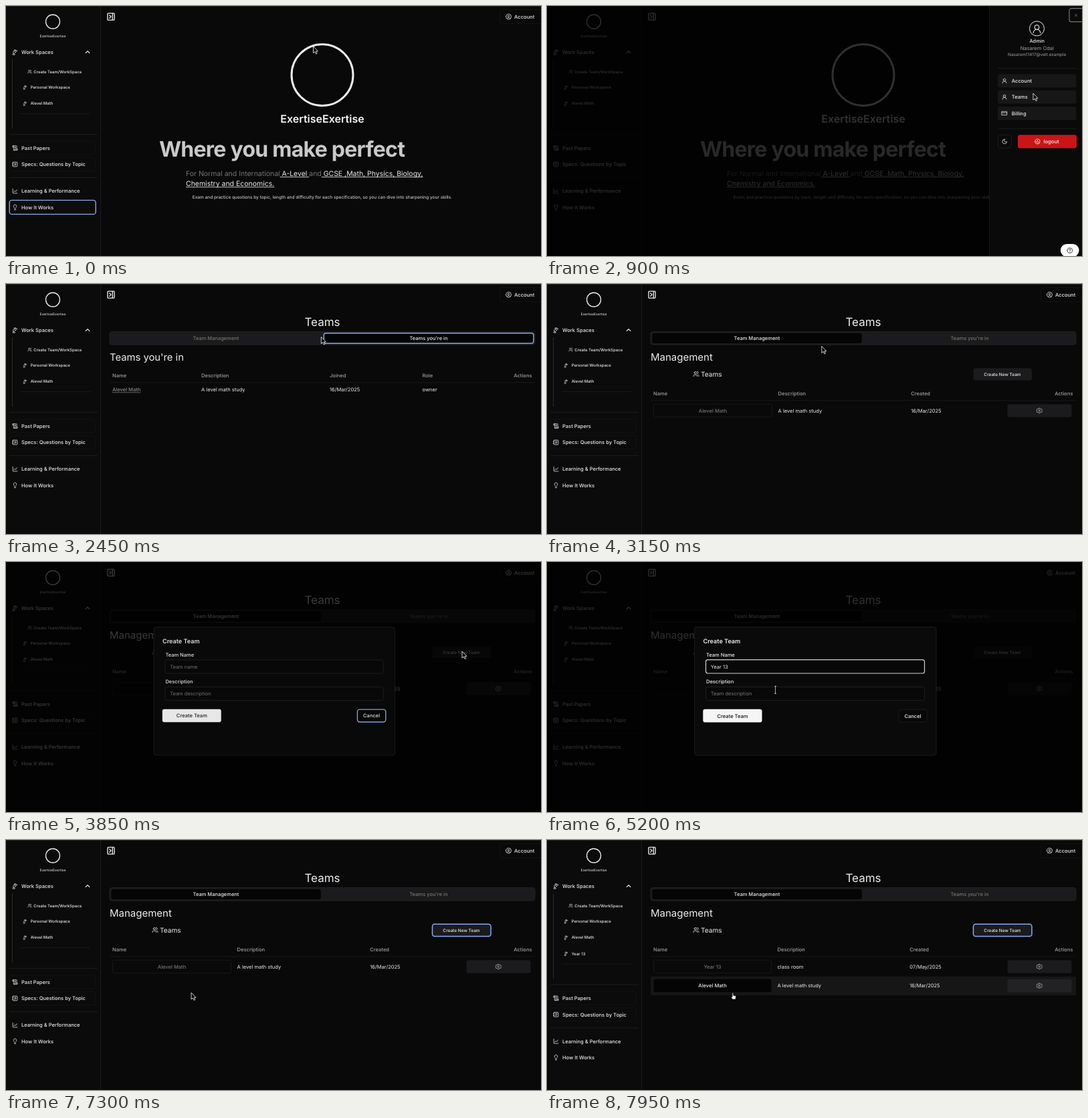
Recreate the animation shown at these times as an HTML page with a canvas. Size 800 by 375 pixels, loop 8000 ms.

```html
<!DOCTYPE html>
<html lang="en">
<head>
<meta charset="utf-8">
<title>Team workspace walkthrough</title>
<style>
html, body { margin: 0; width: 100%; height: 100%; overflow: hidden; background: #090909; }
canvas { display: block; width: 800px; height: 375px; }
</style>
</head>
<body>
<canvas></canvas>
<script>
const LOOP = 8000, W = 800, H = 375;
const WHITE = '#ededed', GREY = '#a0a0a0', DIM = '#757575', LINE = '#1c1c1c';
const PANEL = '#1b1b1d', RING = '#8aabed';
const BRAND = 'ExertiseExertise';

const canvas = document.querySelector('canvas');
const ctx = canvas.getContext('2d');
const dpr = window.devicePixelRatio || 1;
canvas.width = W * dpr;
canvas.height = H * dpr;

// Icons on a 24-unit grid
const RECT = 'M5 3h14a2 2 0 0 1 2 2v14a2 2 0 0 1-2 2H5a2 2 0 0 1-2-2V5a2 2 0 0 1 2-2';
const ROUND = 'M2 12a10 10 0 1 0 20 0a10 10 0 1 0-20 0';
const ICONS = {
  panel: RECT + 'M8 8l4 4-4 4M16 3v18',
  specs: RECT + 'M1 8h4M1 16h4M10 8h6M10 12h6M10 16h4',
  account: ROUND + 'M9 10a3 3 0 1 0 6 0a3 3 0 1 0-6 0M6 19c1-5 11-5 12 0',
  help: ROUND + 'M9 9a3 3 0 1 1 4 3q-1 .5-1 2M12 17v.5',
  power: ROUND + 'M8 10a5 5 0 1 0 8 0M12 7v5',
  user: 'M7 8a5 5 0 1 0 10 0a5 5 0 1 0-10 0M4 21a8 8 0 0 1 16 0',
  users: 'M5 7a4 4 0 1 0 8 0a4 4 0 1 0-8 0M2 21v-2a4 4 0 0 1 4-4h6a4 4 0 0 1 4 4v2M16 3a4 4 0 0 1 0 8M22 21v-2a4 4 0 0 0-3-4',
  lamp: 'M14 5l-3 3 2 7 8-8-7-2ZM14 5l-3 3-3-3 3-3 3 3ZM9 7l-5 5 3 6M3 22v-2a2 2 0 0 1 2-2h4a2 2 0 0 1 2 2v2Z',
  scroll: 'M15 12h-5M15 8h-5M19 17V5a2 2 0 0 0-2-2H4M8 21h12a2 2 0 0 0 2-2v-2H10v2a2 2 0 1 1-4 0V5a2 2 0 1 0-4 0v3h4',
  chart: 'M3 3v16a2 2 0 0 0 2 2h16M7 16l4-5 4 3 5-7',
  bulb: 'M9 18h6M10 22h4M15 14q.3-1.3 1.5-2.5A6 6 0 1 0 7.5 11.5Q8.7 12.7 9 14',
  card: 'M2 5h20v14H2ZM2 10h20',
  moon: 'M12 3a6 6 0 0 0 9 9 9 9 0 1 1-9-9Z',
  up: 'M18 15l-6-6-6 6',
  close: 'M18 6L6 18M6 6l12 12',
  gear: 'M9 12a3 3 0 1 0 6 0a3 3 0 1 0-6 0M10 2h4l1 3 3 1 3-1 2 4-2 3 2 3-2 4-3-1-3 1-1 3h-4l-1-3-3-1-3 1-2-4 2-3-2-3 2-4 3 1 3-1Z'
};
for (const name in ICONS) ICONS[name] = new Path2D(ICONS[name]);

const POINTERS = {
  arrow: { path: new Path2D('M0 0V10L2.4 7.9L4 11.4L5.6 10.7L4.1 7.3H7Z'), fill: '#000', edge: '#fff' },
  hand: { path: new Path2D('M-1 .5q1-1 1.7 0V4l3 .7q1 .4.8 1.6L4 10H-.6L-3 6.4q.4-1 2 .3Z'), fill: '#fff', edge: '#111' },
  beam: { path: new Path2D('M-1.5-5.5H1.5M0-5.5V5.5M-1.5 5.5H1.5'), edge: '#ddd' }
};

// time, x, y, shape (empty hides it)
const POINTER_KEYS = [
  [0, 459.5, 60.5, 'arrow'], [100, 472, 90, 'arrow'], [380, 472, 90, 'arrow'],
  [520, 765, 14, 'hand'], [600, 765, 14, 'arrow'], [900, 727, 131, 'arrow'],
  [1120, 722, 136, 'arrow'], [1300, 722, 136, 'arrow'], [1600, 714, 138, 'hand'],
  [1750, 714, 138, 'arrow'], [2100, 630, 80, 'arrow'], [2250, 630, 80, 'arrow'],
  [2650, 315, 79, 'arrow'], [2900, 315, 79, 'arrow'], [3650, 682, 134, 'arrow'],
  [3870, 682, 134, 'arrow'], [4130, 322, 157, 'beam'], [4350, 322, 157, ''],
  [5050, 322, 157, 'beam'], [5250, 345, 198, 'beam'], [5350, 345, 198, ''],
  [6850, 285.5, 203, 'arrow'], [7000, 277, 229, 'hand'], [7250, 277, 229, 'arrow'],
  [7550, 278, 229, 'hand'], [LOOP, 278, 229, 'hand']
];

const FIELDS = [
  { label: 'Team Name', hint: 'Team name', y: 157, value: 'Year 13', from: 4100, to: 5250,
    keys: [4350, 4450, 4500, 4550, 4650, 4800, 5000] },
  { label: 'Description', hint: 'Team description', y: 197.7, value: 'class room', from: 5250, to: 7080,
    keys: [5350, 5400, 5450, 5500, 5650, 5850, 6350, 6550, 6650, 6700] }
];

const during = (t, a, b) => t >= a && t < b;
function ramp(t, a, b) {
  const p = Math.min(1, Math.max(0, (t - a) / (b - a)));
  return p * p * (3 - 2 * p);
}

// y is the middle of the capital letters
function text(str, x, y, size = 7.55, color = WHITE, weight = 500, align = 'left', spacing = 0) {
  ctx.font = `${weight} ${size}px Inter, sans-serif`;
  ctx.letterSpacing = spacing + 'px';
  ctx.textRendering = 'geometricPrecision';
  ctx.textAlign = align;
  ctx.fillStyle = color;
  ctx.fillText(str, x, y + size * 0.36);
  return ctx.measureText(str).width;
}

function box(x, y, w, h, fill, stroke, radius = 3, lineWidth = 1) {
  ctx.beginPath();
  ctx.roundRect(x, y, w, h, radius);
  if (fill) { ctx.fillStyle = fill; ctx.fill(); }
  if (stroke) { ctx.strokeStyle = stroke; ctx.lineWidth = lineWidth; ctx.stroke(); }
}

function rule(x, y, w, color = LINE, h = 1) {
  ctx.fillStyle = color;
  ctx.fillRect(x, y, w, h);
}

function icon(name, x, y, size, color = WHITE, weight = 2) {
  ctx.save();
  ctx.translate(x - size / 2, y - size / 2);
  ctx.scale(size / 24, size / 24);
  ctx.lineWidth = weight;
  ctx.lineCap = ctx.lineJoin = 'round';
  ctx.strokeStyle = color;
  ctx.stroke(ICONS[name]);
  ctx.restore();
}

function brandMark(x, y, radius, lineWidth) {
  ctx.beginPath();
  ctx.arc(x, y, radius, 0, 7);
  ctx.strokeStyle = WHITE;
  ctx.lineWidth = lineWidth;
  ctx.stroke();
}

function sidebar(t) {
  const grown = t >= 7700;
  const shift = grown ? 24.3 : 0;
  rule(0, 0, 141, '#0b0b0b', H);
  rule(141, 0, 1, LINE, H);
  brandMark(70, 23.5, 10.5, 1.3);
  text(BRAND, 70, 45, 5.15, WHITE, 400, 'center');

  icon('lamp', 13.5, 69, 9);
  text('Work Spaces', 23, 69);
  icon('up', 122, 69, 11, WHITE, 3);
  rule(9, 80, 1, '#2b2b2b', 104 + shift);
  icon('users', 35.5, 98.5, 6.5);
  text('Create Team/WorkSpace', 41.3, 98.5, 6);
  ['Personal Workspace', 'Alevel Math', 'Year 13'].slice(0, grown ? 3 : 2).forEach((name, i) => {
    const y = 122 + i * 24.2;
    icon('lamp', 28.5, y, 6.5);
    text(name, 36.7, y, 6);
  });
  rule(22, 161 + shift, 104, '#191919');

  ctx.save();
  ctx.translate(0, shift);
  rule(5, 192, 132);
  box(5.5, 203, 128, 20, null, '#121212');
  icon('scroll', 13.5, 213, 9);
  text('Past Papers', 23, 213);
  box(5.5, 227.5, 128, 20, null, '#121212');
  icon('specs', 13.5, 237.5, 9);
  text('Specs: Questions by Topic', 23, 237.5);
  rule(5, 257, 132);
  icon('chart', 13.5, 277.5, 9);
  text('Learning & Performance', 23, 277.5);
  if (t < 520) box(5.2, 291.4, 129, 21, '#0d0d0d', RING, 3.5, 1.4);
  icon('bulb', 13.5, 302, 9);
  text('How It Works', 23, 302);
  ctx.restore();
}

function header() {
  rule(0, 0, W, '#222');
  icon('panel', 157, 16, 13.5, WHITE, 2.4);
  box(738.5, 5.5, 70, 21, null, '#131313');
  icon('account', 751.5, 16, 9.5);
  text('Account', 760, 16);
}

function home() {
  brandMark(473, 103.5, 46, 3);
  text(BRAND, 473, 169, 16, '#f5f5f5', 600, 'center');
  text('Where you make perfect', 412.5, 214, 32, '#c9c9c9', 700, 'center', -0.75);
  const runs = [['For Normal and International', 0], [' A-Level ', 1], ['and', 0],
    [' GCSE ', 1], [',Math, Physics, Biology,', 1]];
  const run = (str, x, y, link) => {
    const width = text(str, x, y, 10.47, link ? WHITE : DIM, 400);
    if (link) rule(x, y + 5, width, WHITE, 0.8);
    return width;
  };
  let x = 269;
  for (const [str, link] of runs) x += run(str, x, 251, link);
  run('Chemistry and Economics.', 269, 266.3, 1);
  text('Exam and practice questions by topic, length and difficulty for each specification, so you can dive into sharpening your skills.',
    473, 287, 6.5, '#c8c8c8', 500, 'center');
}

function headings(names, columns, y) {
  names.forEach((name, i) => text(name, columns[i], y, 7.55, GREY));
  text('Actions', 786.5, y, 7.55, GREY, 500, 'right');
  rule(155, y + 10, 636, '#181818');
}

function management(t) {
  const created = t >= 7350;
  const hovered = t >= 7500;
  text('Management', 155, 110, 15, WHITE, 400);
  icon('users', 223, 135, 9.5);
  text('Teams', 230, 135.3, 10.1, WHITE, 400);
  const ring = t >= 7180 ? RING : during(t, 1500, 1800) ? '#2c3cae' : null;
  box(637.5, 126.2, 87.5, 18.3, PANEL, ring, 3.5, 1.5);
  text('Create New Team', 681, 135.3, 6.5, WHITE, 500, 'center');

  const columns = created ? [159, 344.5, 542.3] : [159, 345.6, 544.3];
  headings(['Name', 'Description', 'Created'], columns, 164.3);
  const rows = [['Alevel Math', 'A level math study', '16/Mar/2025']];
  if (created) rows.unshift(['Year 13', 'class room', '07/May/2025']);
  const nameWidth = created ? 176 : 177;
  rows.forEach(([name, about, date], i) => {
    const y = 190 + i * 28.6;
    const hot = hovered && i === 1;
    if (hot) rule(155, y - 14, 636, '#161617', 28.5);
    box(159.5, y - 9.8, nameWidth, 19.5, hot ? '#040404' : null, hot ? null : '#181818');
    text(name, 159.5 + nameWidth / 2, y, 7.55, hot ? WHITE : DIM, 500, 'center');
    text(about, columns[1], y, 7.55, WHITE, 400);
    text(date, columns[2], y, 7.55, WHITE, 400);
    box(688.5, y - 9.8, 96, 19.6, hot ? '#222224' : PANEL);
    icon('gear', 736.3, y, 9, '#c4c4c4', 1.8);
  });
}

function memberships() {
  const columns = [159, 292, 484, 622.5];
  text("Teams you're in", 155, 110, 14.8, WHITE, 400);
  headings(['Name', 'Description', 'Joined', 'Role'], columns, 137.3);
  const width = text('Alevel Math', 159, 158.3, 7.55, '#8a8a8a');
  rule(159, 162.5, width, '#8a8a8a', 0.7);
  ['A level math study', '16/Mar/2025', 'owner'].forEach((str, i) =>
    text(str, columns[i + 1], 158.3, 7.55, WHITE, 400));
}

function teams(t) {
  const joined = during(t, 2150, 2700);
  text('Teams', 473, 56.5, 17, WHITE, 400, 'center');
  box(155, 71.5, 636, 19.5, PANEL, '#222', 3.5);
  const tabRing = joined || during(t, 2700, 3100);
  box(joined ? 475.3 : 157.3, 73.8, 313.5, 15.2, '#050505', tabRing ? RING : null, 3, 1.4);
  text('Team Management', 314, 81.5, 7.5, joined ? DIM : WHITE, 500, 'center');
  text("Teams you're in", 632, 81.5, 7.5, joined ? WHITE : DIM, 500, 'center');
  if (joined) memberships(); else management(t);
}

function shade(amount) {
  rule(0, 0, W, `rgba(0,0,0,${0.8 * amount})`, H);
}

function drawer(open) {
  if (!open) return;
  shade(open);
  ctx.save();
  ctx.translate((1 - open) * 139, 0);
  rule(661, 0, 139, '#0a0a0a', H);
  rule(661, 0, 1, '#151515', H);
  box(781, 3.7, 24, 20, null, '#777', 3, 1.2);
  icon('close', 791, 14, 7, '#888');
  box(721.5, 22.8, 22, 22, null, WHITE, 11, 1);
  icon('user', 732.5, 34.5, 16, WHITE, 1.6);
  text('Admin', 732.7, 52.5, 7.4, WHITE, 500, 'center');
  text('Nasarem Odal', 732.7, 63.3, 7.5, GREY, 400, 'center');
  text('Nasarem11417@velt.example', 732.7, 73, 6.45, GREY, 400, 'center');
  rule(674, 93, 118);
  [['user', 'Account'], ['user', 'Teams'], ['card', 'Billing']].forEach(([name, label], i) => {
    const y = 112.3 + i * 24.3;
    box(674, y - 10, 117.5, 20, '#171718');
    icon(name, 684, y, 9);
    text(label, 694.8, y);
  });
  rule(674, 183.5, 118);
  box(674.5, 193.5, 20, 19.5, null, '#1a1a1a');
  icon('moon', 684.3, 203.3, 9);
  box(704, 193.3, 88, 20, '#c91518');
  icon('power', 733.5, 203.3, 9);
  text('logout', 742.5, 203.3, 7.7);
  box(768, 357, 27.5, 19, '#fff', null, 9);
  icon('help', 781.8, 366.7, 9.5, '#111');
  ctx.restore();
}

function field(f, t) {
  const focused = during(t, f.from, f.to);
  const count = f.keys.filter(k => t >= k).length;
  const typed = f.value.slice(0, count);
  text(f.label, 238, f.y - 18, 7.5);
  box(237.5, f.y - 10.3, 327, 20.3, '#080808', focused ? '#d2d2d2' : '#1f1f1f', 3, focused ? 1.2 : 1);
  const width = text(typed || f.hint, 244.7, f.y, 7.55, typed ? WHITE : DIM, 400);
  const lastKey = count ? f.keys[count - 1] : f.from;
  if (focused && (t - lastKey) % 400 < 200) rule(244.7 + (typed ? width : 0), f.y - 4.5, 0.8, WHITE, 9);
}

function dialog(t) {
  const open = ramp(t, 3740, 3870) * (1 - ramp(t, 7080, 7280));
  if (!open) return;
  shade(open);
  const zoom = 0.95 + 0.05 * open;
  ctx.save();
  ctx.globalAlpha = open;
  ctx.translate(401.3, 193.8);
  ctx.scale(zoom, zoom);
  ctx.translate(-401.3, -193.8);
  box(220.5, 97.5, 361.5, 192.5, '#0a0a0a', '#1c1c1c', 3.5);
  text('Create Team', 233.5, 118.5, 9.1, WHITE, 600);
  for (const f of FIELDS) field(f, t);
  box(233.3, 220.8, 88.2, 19.7, '#f5f5f5');
  text('Create Team', 277.5, 230.8, 7.6, '#161616', 500, 'center');
  const cancelFocused = t < 4100;
  box(525.8, 221.2, 42.5, 19, '#080808', cancelFocused ? RING : '#1c1c1c', 3.5, cancelFocused ? 1.4 : 1);
  text('Cancel', 547, 230.8, 7.55, WHITE, 500, 'center');
  ctx.restore();
}

function pointer(t) {
  const next = POINTER_KEYS.findIndex(k => k[0] > t);
  const [t0, x0, y0, shape] = POINTER_KEYS[next - 1];
  const [t1, x1, y1] = POINTER_KEYS[next];
  if (!shape) return;
  const p = ramp(t, t0, t1);
  const { path, fill, edge } = POINTERS[shape];
  ctx.save();
  ctx.translate(x0 + (x1 - x0) * p, y0 + (y1 - y0) * p);
  ctx.lineWidth = 0.8;
  ctx.strokeStyle = edge;
  if (fill) { ctx.fillStyle = fill; ctx.fill(path); }
  ctx.stroke(path);
  ctx.restore();
}

function draw(now) {
  const t = now % LOOP;
  ctx.setTransform(dpr, 0, 0, dpr, 0, 0);
  rule(0, 0, W, '#090909', H);
  sidebar(t);
  header();
  if (t < 1250) home(); else teams(t);
  drawer(ramp(t, 520, 820) * (1 - ramp(t, 1120, 1350)));
  dialog(t);
  pointer(t);
}

const start = performance.now();
(function tick() {
  draw(performance.now() - start);
  requestAnimationFrame(tick);
})();
</script>
</body>
</html>
```
